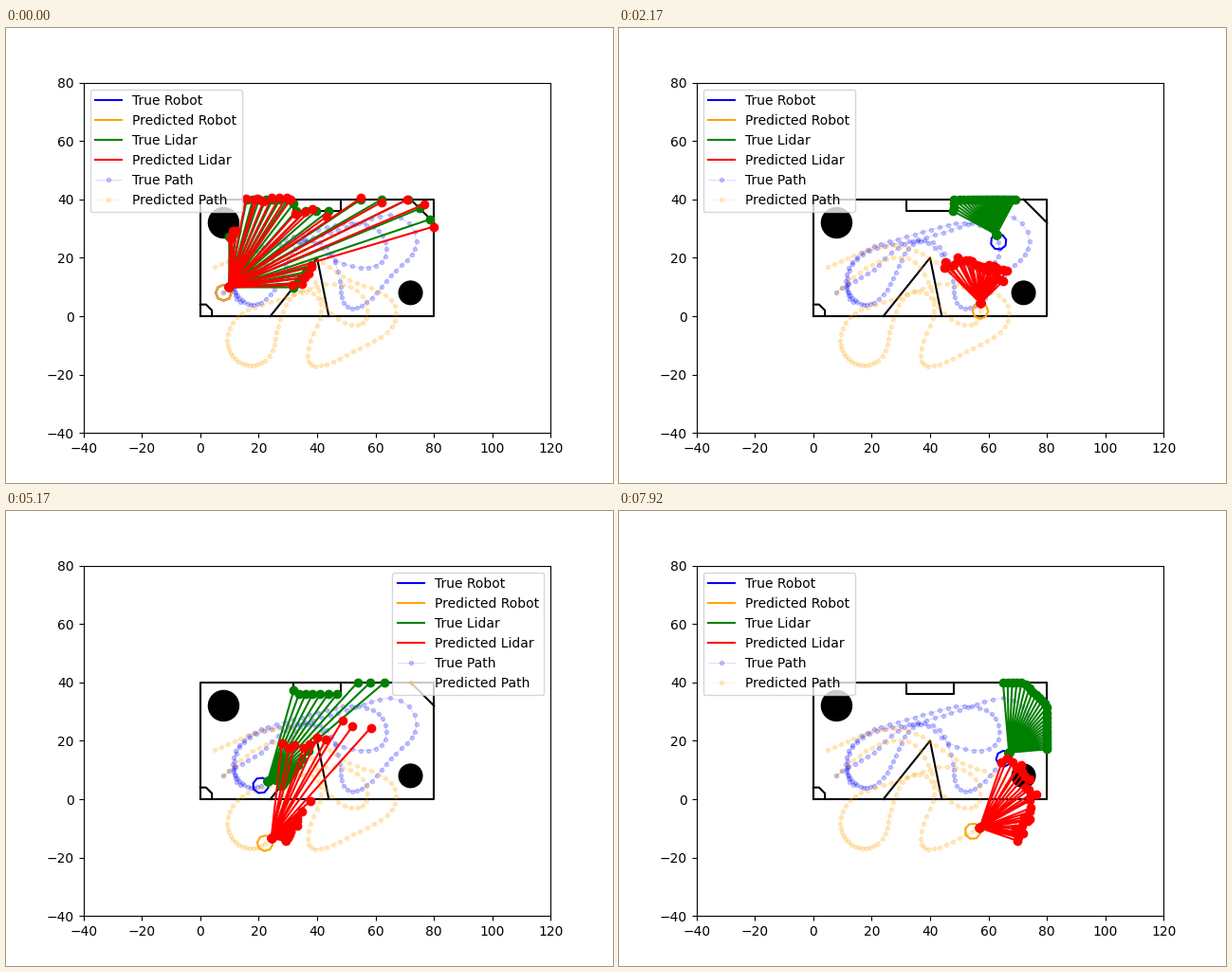
These frames come from a looping animation (640 by 480 pixels, 8 s). A matplotlib script:

```python
import numpy as np
import matplotlib.pyplot as plt
from matplotlib.animation import FuncAnimation
from matplotlib.lines import Line2D

STEPS, LOOP_MS = 96, 8000
FRAMES = STEPS + 1  # the last pose is held for one more frame
RADIUS = 2.7
FAN = np.linspace(np.pi / 4, -np.pi / 4, 25)

WALLS = [
    [(0, 0), (80, 0), (80, 40), (0, 40), (0, 0)],
    [(32, 40), (32, 36), (48, 36), (48, 40)],
    [(24, 0), (40, 20), (44, 0)],
    [(0, 4), (2, 4), (4, 2), (4, 0)],
    [(72, 40), (80, 32)],
]
PILLARS = [(8, 32, 5.2), (72, 8, 4)]

# poses to drive through: step, x, y, heading in degrees
TRUE_POSES = [
    (0, 8, 8, 45), (7, 22.5, 17.6, 48), (13, 36.8, 25.8, 0),
    (17, 46.3, 19.3, -30), (25, 63.8, 23, 90), (34, 46.2, 31.2, 195),
    (42, 23.2, 24.7, 196), (50, 11.2, 12, 270), (62, 20.7, 4.7, 389),
    (68, 28.3, 15, 428), (75, 38, 25.9, 360), (81, 47.8, 12, 280),
    (85, 49.1, 4.7, 305), (95, 65.3, 13.9, 410), (101, 74, 25.5, 450),
    (106, 61.5, 34.2, 557), (118, 27, 24.6, 547), (126, 11.8, 13, 625),
    (132, 13.6, 4.9, 690),
]
PRED_POSES = [
    (0, 8, 8, 45), (10, 30, 20.2, 0), (17, 41.6, 6, -69),
    (26, 57.2, 1.8, 90), (34, 40.1, 10.2, 198), (42, 18.6, 3, 197),
    (49, 9.2, -8.5, 270), (62, 22.2, -15.1, 398), (68, 26.6, -3.5, 435),
    (75, 36.5, 8.6, 355), (80, 40.9, -0.8, 252), (85, 36.8, -13.6, 272),
    (95, 54.6, -11, 386), (102, 67, 1, 450), (108, 56, 10.4, 525),
    (120, 27.5, 24.3, 540), (130, 5, 16.9, 560),
]
# legend position: left edge, right edge and clutter of the fixed scenery
SPOTS = {"upper right": (65.7, 118, 4), "upper left": (-38, 14.6, 8),
         "upper center": (14.6, 65.7, 6)}
LEGEND_BOTTOM = 35.7


def unit(angle):
    return np.stack([np.cos(angle), np.sin(angle)], axis=-1)


def position(poses, step):
    """Join the poses with near-circular cubic arcs."""
    t, x, y, heading = np.array(poses, float).T
    p, a = np.column_stack([x, y]), np.radians(heading)
    k = np.clip(np.searchsorted(t, step, side="right") - 1, 0, len(t) - 2)
    u = ((step - t[k]) / (t[k + 1] - t[k]))[..., None]
    chord = np.linalg.norm(p[k + 1] - p[k], axis=-1)
    reach = (chord / np.cos((a[k + 1] - a[k]) / 4) ** 2)[..., None]
    return (p[k] + (p[k + 1] - p[k]) * u * u * (3 - 2 * u)
            + reach * u * (1 - u) * (unit(a[k]) * (1 - u) - unit(a[k + 1]) * u))


def pose(poses, step):
    here, ahead = position(poses, np.array([step, step + 0.01]))
    dx, dy = ahead - here
    heading = np.arctan2(dy, dx)
    return here, heading, here + RADIUS * unit(heading)


def cast(origin, angle):
    """Distance from origin to the nearest obstacle along angle."""
    d = unit(angle)
    best = 120.0
    for line in WALLS:
        for (ax_, ay), (bx, by) in zip(line, line[1:]):
            ex, ey = bx - ax_, by - ay
            wx, wy = ax_ - origin[0], ay - origin[1]
            det = d[0] * ey - d[1] * ex
            if abs(det) < 1e-9:
                continue
            dist = (wx * ey - wy * ex) / det
            along = (wx * d[1] - wy * d[0]) / det
            if dist > 1e-6 and 0 <= along <= 1:
                best = min(best, dist)
    for cx, cy, radius in PILLARS:
        w = np.array([cx, cy]) - origin
        along = w @ d
        gap = radius ** 2 - (w @ w - along ** 2)
        if gap > 0 and along > 0:
            best = min(best, along - np.sqrt(gap))
    return best


def outline(center, heading):
    return (center + RADIUS * unit(heading + np.linspace(0, 2 * np.pi, 9))).T


def rays(origin, hits):
    """Separate strokes from the sensor to every hit."""
    pts = np.full((3 * len(hits), 2), np.nan)
    pts[0::3], pts[1::3] = origin, hits
    return pts.T


def calm_spot(hits):
    """Legend position with the least behind it."""
    def clutter(name):
        left, right, base = SPOTS[name]
        x, y = hits.T
        return base + 2 * np.sum((x > left) & (x < right) & (y > LEGEND_BOTTOM))
    return min(SPOTS, key=clutter)


fig, ax = plt.subplots(figsize=(6.4, 4.8), dpi=100)
ax.set_aspect("equal")
ax.set_xlim(-40, 120)
ax.set_ylim(-40, 80)

for wall in WALLS:
    ax.plot(*zip(*wall), color="black")
for cx, cy, radius in PILLARS:
    ax.add_patch(plt.Circle((cx, cy), radius, color="black"))

trails = [ax.plot(*position(poses, np.arange(poses[-1][0] + 1)).T, color=color,
                  marker=".", alpha=0.2, lw=0.5)[0]
          for poses, color in ((TRUE_POSES, "blue"), (PRED_POSES, "orange"))]
true_robot, = ax.plot([], [], color="blue")
pred_robot, = ax.plot([], [], color="orange")
true_lidar, = ax.plot([], [], "o-", color="green")
pred_lidar, = ax.plot([], [], "o-", color="red")

handles = [Line2D([], [], color=c) for c in ("blue", "orange", "green", "red")]
labels = [f"{kind} {part}" for part in ("Robot", "Lidar", "Path")
          for kind in ("True", "Predicted")]
legend = ax.legend(handles + trails, labels, loc="upper left")


def update(frame):
    step = min(frame, STEPS - 1)
    center, heading, nose = pose(TRUE_POSES, step)
    angles = heading + FAN
    ranges = np.array([cast(nose, a) for a in angles])
    true_hits = nose + ranges[:, None] * unit(angles)
    true_robot.set_data(*outline(center, heading))
    true_lidar.set_data(*rays(nose, true_hits))

    # the estimate sees the same ranges, with noise, from its own pose
    rng = np.random.default_rng(100 + step)
    center, heading, nose = pose(PRED_POSES, step)
    angles = heading + FAN + rng.normal(0, 0.02, len(FAN))
    noisy = np.abs(ranges + rng.normal(0, 0.9, len(FAN)))
    pred_hits = nose + noisy[:, None] * unit(angles)
    pred_robot.set_data(*outline(center, heading))
    pred_lidar.set_data(*rays(nose, pred_hits))

    legend.set_loc(calm_spot(np.vstack([true_hits, pred_hits])))
    return true_robot, pred_robot, true_lidar, pred_lidar, legend


anim = FuncAnimation(fig, update, frames=FRAMES, interval=LOOP_MS / FRAMES,
                     repeat=True, repeat_delay=0, blit=False)
plt.show()
```
